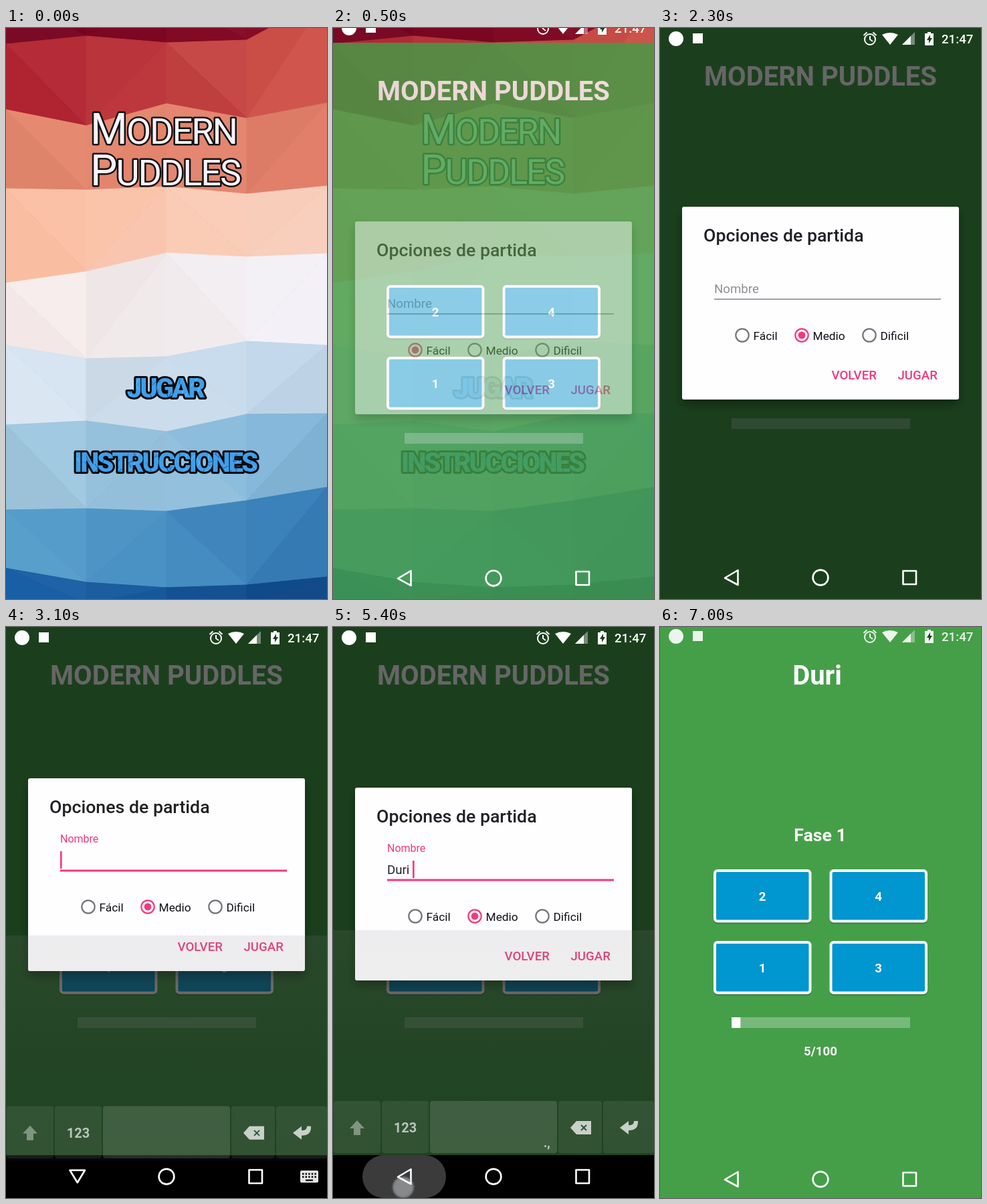
Animation of 480 by 853 pixels, one loop 7100 ms. Source, as an HTML page:

```html
<!DOCTYPE html>
<html lang="es">
<head>
<meta charset="utf-8">
<style>
html, body { margin: 0; width: 100%; height: 100%; overflow: hidden; background: #000; }
svg { display: block; width: 100vw; height: 100vh; font-family: Roboto, sans-serif; }
text { white-space: pre; }
.mid { text-anchor: middle; }
.bold { font-weight: 700; fill: #fff; }
.logo { font-size: 64px; font-weight: 400; letter-spacing: -2px; fill: #f6f2f8; stroke: #111; stroke-width: 5; paint-order: stroke; stroke-linejoin: round; }
.logo tspan { font-size: 54px; }
.menu { font-size: 40px; font-weight: 900; letter-spacing: -3px; fill: url(#cracked); stroke: #05080c; stroke-width: 6; paint-order: stroke; stroke-linejoin: round; }
.option { font-size: 17.33px; fill: #111; }
.action { font-size: 18.67px; font-weight: 500; fill: #f23a79; }
.line { fill: none; stroke: #fff; stroke-width: 2.6; stroke-linejoin: round; }
</style>
</head>
<body>
<svg viewBox="0 0 480 853" preserveAspectRatio="none">
  <defs>
    <pattern id="cracked" patternUnits="userSpaceOnUse" y="519" width="480" height="111">
      <rect width="480" height="111" fill="#419fe8"/>
      <g id="cracks" fill="none"></g>
    </pattern>
    <filter id="shadow" x="-10%" y="-10%" width="120%" height="130%">
      <feDropShadow dx="0" dy="8" stdDeviation="7" flood-opacity=".35"/>
    </filter>
    <radialGradient id="dot">
      <stop offset=".6" stop-color="#fff" stop-opacity=".8"/>
      <stop offset=".8" stop-color="#dfe8f0" stop-opacity=".8"/>
      <stop offset=".86" stop-color="#9db6cc" stop-opacity=".6"/>
      <stop offset="1" stop-color="#9db6cc" stop-opacity="0"/>
    </radialGradient>
    <linearGradient id="veil" x2="0" y2="1">
      <stop stop-color="#828282" stop-opacity=".14"/>
      <stop offset="1" stop-color="#628262" stop-opacity=".06"/>
    </linearGradient>
  </defs>

  <g id="poly"></g>
  <g id="logo" class="logo">
    <text x="126" y="173">M<tspan>ODERN</tspan></text>
    <text x="126" y="235">P<tspan>UDDLES</tspan></text>
  </g>
  <text class="menu mid" x="238" y="552">JUGAR</text>
  <text class="menu mid" x="238" y="663">INSTRUCCIONES</text>

  <g id="game">
    <rect width="480" height="923" fill="#459f48"/>
    <text id="heading" class="bold mid" x="240" y="86" font-size="40"></text>
    <text id="phase" class="bold mid" x="239.5" y="320" font-size="26.67">Fase 1</text>
    <g id="tiles"></g>
    <rect x="107" y="583" width="267" height="16" fill="#fff" opacity=".27"/>
    <rect id="bar" x="107" y="583" height="16" fill="#fff"/>
    <text id="score" class="bold mid" x="240" y="640" font-size="18.67"></text>
  </g>
  <rect id="dim" width="480" height="853"/>

  <g id="dialog">
    <rect x="33" width="414" height="288" rx="3" fill="#fefdff" filter="url(#shadow)"/>
    <text x="65" y="52" font-size="26.67" font-weight="500" fill="#212121">Opciones de partida</text>
    <text id="hint" x="81">Nombre</text>
    <text id="name" x="81" y="129" font-size="18.67" fill="#212121"></text>
    <rect id="compose" x="82" y="131" height="2.5" fill="#2196e8"/>
    <rect id="cursor" y="109" width="2.6" height="26" fill="#f23a79"/>
    <rect id="field" x="81" width="339"/>
    <g id="radios"></g>
    <text class="action" x="256.5" y="258">VOLVER</text>
    <text class="action" x="355.5" y="258">JUGAR</text>
  </g>

  <rect id="navBack" y="789" width="480" height="64"/>
  <g id="keyboard">
    <rect y="453" width="480" height="336" fill="url(#veil)"/>
    <g id="keys" fill="#fff"></g>
    <path d="M36 737l11 12h-6v10h-10v-10h-6z" fill="#809482"/>
    <text class="mid" x="108" y="755" font-size="20" font-weight="700" fill="#b9c5bb">123</text>
    <path d="M355 748l9-10h22v20h-22z" fill="#c8d0c9"/>
    <path d="M371 744l8 8m0-8l-8 8" stroke="#30533a" stroke-width="2"/>
    <path d="M429 748l13-10v6q8 1 8-6h6q1 14-14 14v6z" fill="#c8d0c9"/>
    <text id="marks" x="315" y="777" font-size="18" font-weight="700" fill="#c8d0c9">.,</text>
  </g>

  <g id="nav">
    <rect id="ripple" x="44" y="789" width="125" height="64" rx="32" fill="#fff"/>
    <path id="back" class="line"/>
    <circle class="line" cx="240" cy="821" r="11.4"/>
    <rect class="line" x="363.5" y="811" width="19.5" height="20"/>
    <g id="imeIcon">
      <rect x="440" y="812" width="27" height="18" rx="2" fill="#e4e4e4"/>
      <path d="M443 817h21M443 821.5h21" stroke="#000" stroke-width="2.4" stroke-dasharray="2.4 2.2"/>
      <path d="M448 826.5h11" stroke="#000" stroke-width="2.2"/>
    </g>
  </g>

  <g id="status" fill="#fff">
    <circle cx="24" cy="16" r="11"/>
    <rect x="49" y="8" width="15" height="15"/>
    <g class="line" style="stroke-width:2">
      <circle cx="314" cy="17" r="8"/>
      <path d="M314 12v5l4 3M304.5 11l5-4.5m9 0l5 4.5"/>
    </g>
    <path d="M332 10q12-6 24 0l-12 15z"/>
    <path d="M362 25h19v-19z" opacity=".4"/>
    <path d="M362 25h13v-13z"/>
    <path d="M396 8h4v-2h5v2h4v18h-13z"/>
    <path d="M404 10l-5 8h3v5l5-8h-3z" fill="#1c3c1e"/>
    <text x="421" y="23" font-size="18.67" font-weight="500">21:47</text>
  </g>
  <g id="touches"></g>
</svg>

<script>
const LOOP = 7100, STEP = 100, PINK = '#f23a79', NAME = 'Duri ';
const $ = id => document.getElementById(id);
const set = (el, attrs) => { for (const k in attrs) el.setAttribute(k, attrs[k]); return el; };
const add = (parent, tag, attrs, text = '') => {
  const el = document.createElementNS('http://www.w3.org/2000/svg', tag);
  el.textContent = text;
  return $(parent).appendChild(set(el, attrs));
};
const ramp = (t, from, to) => Math.min(1, Math.max(0, (t - from) / (to - from)));
const easeOut = (p, power = 3) => 1 - (1 - p) ** power;
const within = (t, from, to) => t >= from && t < to;
const shift = (id, y) => set($(id), { transform: `translate(0 ${y})` });

let seed = 7;
const random = () => (seed = seed * 16807 % 2147483647) / 2147483647;

// Faceted backdrop: each band hangs from the edge above down to its own evenly spaced heights.
let upper = [-50, -50, -50, -50, -50];
function band(left, right, ...lower) {
  const corner = (heights, i) => [i * 120, heights[i]];
  for (let i = 0; i < 4; i++) {
    const a = corner(upper, i), b = corner(upper, i + 1), c = corner(lower, i), d = corner(lower, i + 1);
    for (const points of i % 2 ? [[a, b, c], [b, c, d]] : [[a, b, d], [a, c, d]]) {
      const x = points.reduce((sum, p) => sum + p[0], 0) / 14.4;
      const shade = random() * 8 - 4;
      const fill = `color-mix(in srgb, ${shade > 0 ? 'white' : 'black'} ${Math.abs(shade)}%, color-mix(in srgb, ${right} ${x}%, ${left}))`;
      add('poly', 'polygon', { points: points.join(' '), style: `fill:${fill};stroke:${fill}` });
    }
  }
  upper = lower;
}
band('#75001f', '#8c1028', 24, 12, 22, 18, -46);
band('#ad1d2e', '#d2584c', 122, 146, 113, 135, 112);
band('#e58a70', '#e27e69', 240, 242, 237, 248, 236);
band('#f9bb9e', '#fbd3c2', 381, 364, 336, 342, 337);
band('#f7ebe9', '#f3f2f8', 474, 494, 491, 468, 474);
band('#dbe6f2', '#c0d7ea', 593, 587, 603, 577, 576);
band('#a4cbe2', '#7fb4d8', 720, 718, 722, 706, 686);
band('#5ea5d1', '#3279b5', 807, 828, 836, 832, 820);
band('#1a62a8', '#0d4585', 860, 860, 860, 860, 860);

for (let i = 0; i < 150; i++) {
  const d = `M${random() * 480} ${random() * 40}l${random() * 16 - 8} ${random() * 12}l${random() * 12 - 6} ${random() * 8}`;
  add('cracks', 'path', { d, stroke: i % 3 ? '#1c5c9c' : '#6cc4ff', 'stroke-width': 1 });
}

[...'2413'].forEach((digit, i) => {
  const x = 80 + i % 2 * 173.5, y = 362 + (i >> 1) * 107;
  add('tiles', 'rect', { x, y: y + 1.5, width: 146.5, height: 80, rx: 6, opacity: .2 });
  add('tiles', 'rect', { x, y, width: 146.5, height: 79.5, rx: 6, fill: '#fff' });
  add('tiles', 'rect', { x: x + 4, y: y + 4, width: 138.5, height: 71.5, rx: 2, fill: '#0096cf' });
  add('tiles', 'text', { class: 'bold mid', x: x + 73.2, y: y + 47, 'font-size': 18.67 }, digit);
});

const radios = [['Fácil', 123], ['Medio', 212], ['Dificil', 313]].map(([label, cx]) => {
  add('radios', 'text', { class: 'option', x: cx + 16.5, y: 198.5 }, label);
  return {
    ring: add('radios', 'circle', { cx, cy: 192, r: 9.7, fill: 'none', 'stroke-width': 2.2 }),
    core: add('radios', 'circle', { cx, cy: 192, r: 5.4, fill: PINK })
  };
});

// Every fader shows at its start, holds, then fades out.
const faders = [];
const fader = (el, from, hold, fade, alpha = 1) => faders.push({ el, from, hold, fade, alpha });
const tap = (from, cx, cy) => fader(add('touches', 'circle', { cx, cy, r: 18, fill: 'url(#dot)' }), from, 100, 200);
const key = (x, y, width, height, opacity) => add('keys', 'rect', { x, y, width, height, rx: 4, opacity });

// Bottom row, given by the gaps between its keys.
[0, 72, 144, 336, 403, 481].reduce((left, right) => {
  key(left + 1, 708, right - left - 2, 78, right - left > 100 ? .14 : .08);
  return right;
});

const typedAt = i => 3500 + 300 * i;
const rows = ['qwertyuiop', 'asdfghjkl', 'zxcvbnm'];
[...NAME.toLowerCase()].forEach((char, i) => {
  const row = rows.findIndex(letters => letters.includes(char));
  const x = row < 0 ? 240 : 24 + 48 * rows[row].indexOf(char) + [0, 24, 72][row];
  const y = row < 0 ? 708 : 453 + 80 * row;
  tap(typedAt(i) - 300, x - 8, y + 60);
  fader(row < 0 ? key(145, y, 190, 78) : key(x - 40, y, 81, 95), typedAt(i) - 100, 0, 350, .14);
});

tap(100, 240, 540);
tap(1800, 215, 462);
tap(2500, 190, 392);
tap(5200, 105, 837);
tap(6700, 399, 522);
fader($('ripple'), 5200, 200, 300, .23);

function draw(t) {
  const started = t >= 6800;
  const slide = 68 * (1 - easeOut(ramp(t, 430, 780), 5));
  const closing = ramp(t, 6750, 6980);
  const ime = easeOut(ramp(t, 2850, 3200)) - easeOut(ramp(t, 5350, 5700));
  const focus = easeOut(ramp(t, 2600, 2800));
  const leave = ramp(t, 6950, 7000);

  set($('logo'), { transform: `translate(241 182) scale(${1 - .045 * ramp(t, 0, 500)}) translate(-241 -182)` });

  shift('game', Math.round(slide)).style.opacity = easeOut(ramp(t, 430, 630), 4);
  $('heading').textContent = started ? NAME : 'MODERN PUDDLES';
  const points = started ? Math.floor((t - 6800) / 40) : 0;
  $('phase').style.opacity = $('score').style.opacity = +started;
  $('score').textContent = points + '/100';
  set($('bar'), { width: 2.67 * points });
  $('dim').style.opacity = .6 * (ramp(t, 490, 790) - closing);

  shift('dialog', Math.round(266.6 + slide - 42 * ime)).style.opacity = ramp(t, 430, 580) - closing;
  set($('hint'), { y: 128.5 - 32.5 * focus, 'font-size': 18.67 - 2.67 * focus, fill: focus ? PINK : '#909090' });
  set($('field'), focus ? { y: 136.5, height: 3, fill: PINK } : { y: 137.5, height: 1.2, fill: '#666' });
  const count = Math.max(0, Math.floor((t - typedAt(0)) / 300) + 1);
  const name = $('name');
  name.textContent = NAME.slice(0, count);
  const length = name.getComputedTextLength();
  set($('compose'), { width: count < NAME.length ? Math.max(0, length - 1) : 0 });
  set($('cursor'), { x: 81 + length });
  $('cursor').style.opacity = +(focus > 0 && !within(t, 5900, 6300));
  radios.forEach(({ ring, core }, i) => {
    const chosen = i === +(t >= 2000);
    set(ring, { stroke: chosen ? PINK : '#757575' });
    core.style.opacity = +chosen;
  });

  const shown = ramp(t, 2850, 3000) - ramp(t, 5420, 5700);
  const lift = easeOut(ramp(t, 2850, 3200)) - ramp(t, 5420, 5700) ** 2;
  shift('keyboard', 336 * (1 - lift)).style.opacity = shown;
  $('navBack').style.opacity = shown;
  $('marks').style.opacity = +(count >= NAME.length);

  const down = within(t, 2900, 5300);
  set($('back'), { d: down ? 'M95.5 811.5h22.5l-11.2 18.5z' : 'M97 821.5l19.5-11.5v22z' });
  $('imeIcon').style.opacity = +down;
  shift('nav', 64 * (1 - ramp(t, 300, 503)) + 4 * leave);
  shift('status', -32 * (1 - ramp(t, 400, 600)) - 2 * leave).style.opacity = 1 - .1 * leave;

  for (const { el, from, hold, fade, alpha } of faders) {
    el.style.opacity = t < from ? 0 : alpha * (1 - ramp(t, from + hold, from + hold + fade));
  }
}

const begin = performance.now();
function tick() {
  const t = (performance.now() - begin) % LOOP;
  draw(Math.floor(t / STEP) * STEP);
  requestAnimationFrame(tick);
}
tick();
</script>
</body>
</html>
```
